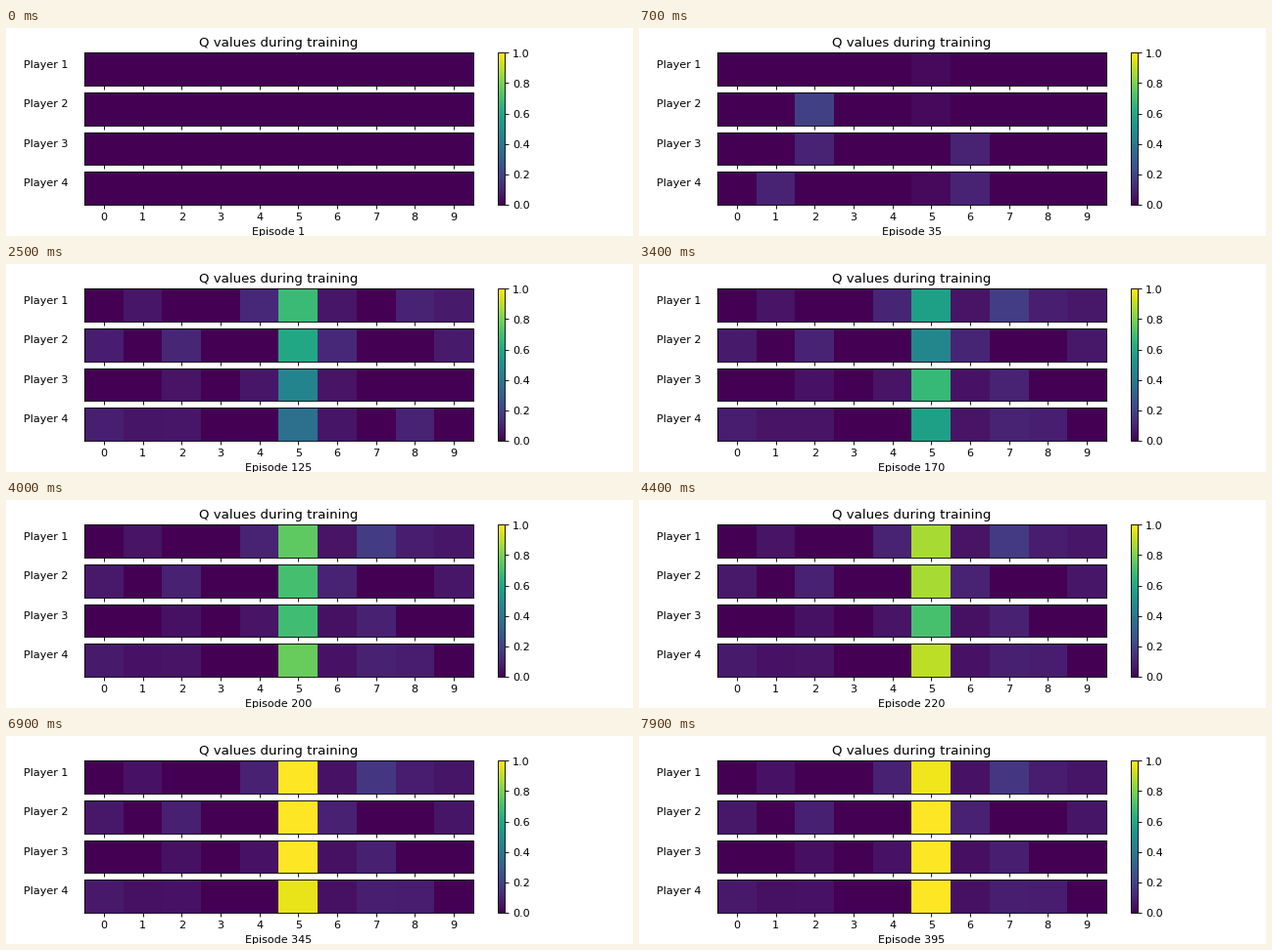
A matplotlib script for the animation above (8000 ms loop, 640 by 213 pixels).

```python
import numpy as np
import matplotlib.pyplot as plt
from matplotlib.animation import FuncAnimation

plt.rcParams["font.family"] = "DejaVu Sans"

PLAYERS, ACTIONS, FRAMES = 4, 10, 80
ALPHA = 0.1               # learning rate
KEEP = (1 - ALPHA) ** 5   # five episodes per step
BEST = 5                  # action every player settles on

# Side actions: who tries them, roughly when, and which are rewarded twice
TRIED = ["146789", "0269", "2467", "012678"]
TWICE = ["47", "26", "", ""]
FIRST_TRY = [16, 7, 7, 7, 7, 7, 7, 30, 22, 12]

# Best action: a shaky climb through a few levels, then convergence to 1
STEPS = [6, 13, 25, 34, 44]
LEVELS = [[0, .18, .68, .57, .87],
          [0, .18, .60, .46, .87],
          [0, .00, .45, .67, .71],
          [0, .17, .37, .57, .90]]
SLIPS = {0: 76, 3: 67}    # player: step of a late unrewarded try

jitter = np.random.default_rng(4).integers(-1, 2, (PLAYERS, ACTIONS))


def exploration(n):
    return 1.27 * np.exp(-n / 15)


def side_value(player, action, n):
    """Jump at the first reward, then fade as long as exploration lasts."""
    start = FIRST_TRY[action] + jitter[player, action]
    if n < start:
        return 0
    rewards = 2 if str(action) in TWICE[player] else 1
    peak = 1 - (1 - ALPHA) ** rewards
    return peak * np.exp(exploration(n) - exploration(start))


def best_value(player, n):
    value = np.interp(n, STEPS, LEVELS[player])
    gap = (1 - value) * KEEP ** max(0, n - STEPS[-1])
    slip = SLIPS.get(player, FRAMES)
    if n >= slip:
        gap += ALPHA * KEEP ** (n - slip)
    return 1 - gap


def q_values(player, n):
    q = np.zeros((1, ACTIONS))
    for action in map(int, TRIED[player]):
        q[0, action] = side_value(player, action, n)
    q[0, BEST] = best_value(player, n)
    return q


fig, axes = plt.subplots(PLAYERS, sharex=True, figsize=(8, 8 / 3), dpi=80)
fig.subplots_adjust(left=0.125, right=0.9, bottom=0.15, top=0.88, hspace=0.2)

images = []
for i, ax in enumerate(axes):
    images.append(ax.imshow(q_values(i, 0), cmap="viridis", vmin=0, vmax=1,
                            aspect="auto", interpolation="nearest"))
    ax.set_xticks(range(ACTIONS))
    ax.set_yticks([])
    ax.set_ylabel(f"Player {i + 1}", rotation=0, labelpad=35)
axes[0].set_title("Q values during training")
fig.colorbar(images[0], ax=list(axes))


def update(n):
    for i, image in enumerate(images):
        image.set_data(q_values(i, n))
    axes[-1].set_xlabel(f"Episode {max(1, 5 * n)}")
    return images


anim = FuncAnimation(fig, update, frames=FRAMES, interval=100,
                     repeat=True, repeat_delay=0, blit=False)
plt.show()
```
